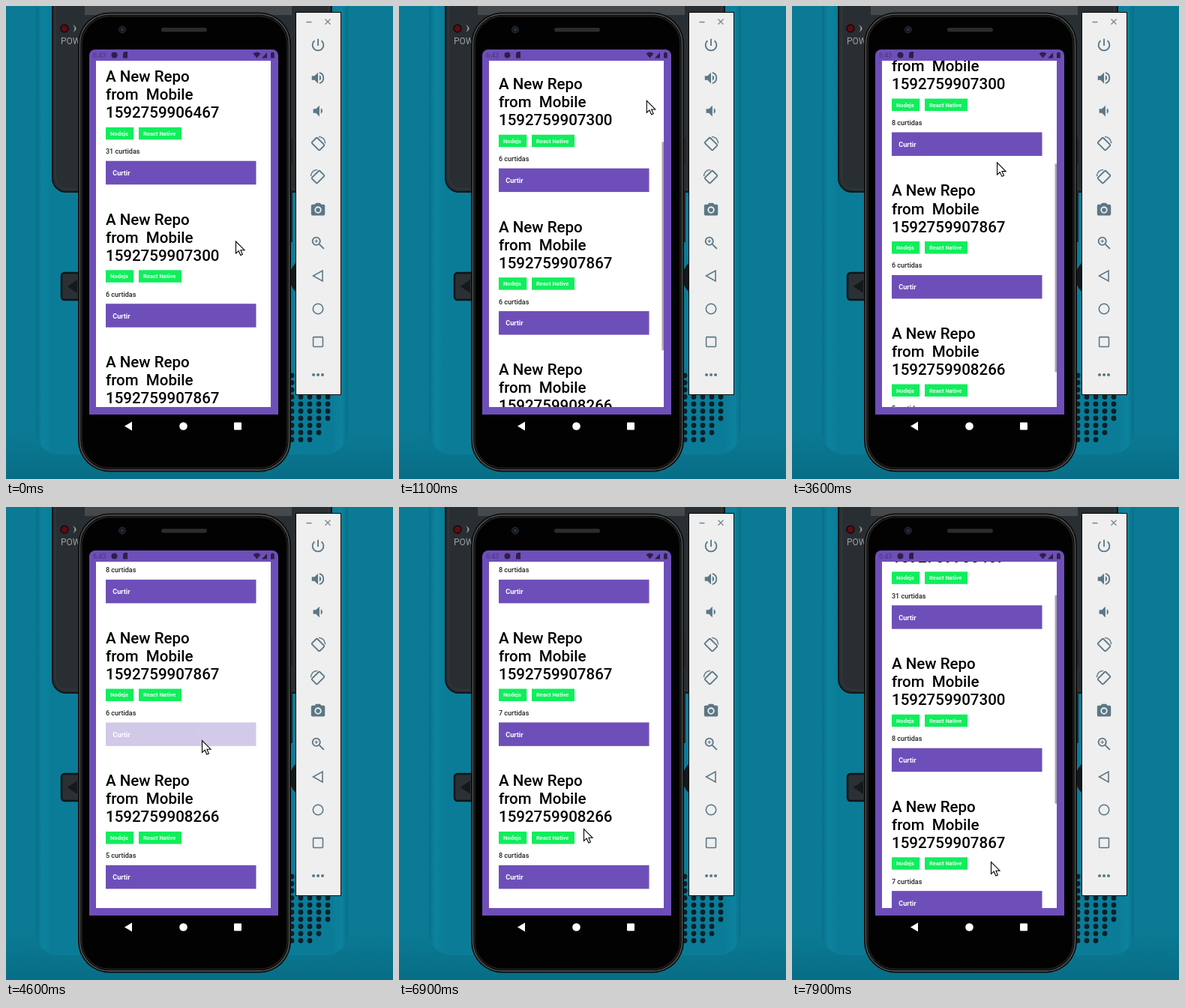
An HTML page for the animation above (8000 ms loop, 516 by 631 pixels).

```html
<!DOCTYPE html>
<html lang="pt">
<head>
<meta charset="utf-8">
<title>Lista de repositórios</title>
<style>
html, body { margin: 0; width: 100%; height: 100%; overflow: hidden; background: #0b7a94; }
svg { position: fixed; left: 0; top: 0; display: block; }
text { font-family: Roboto, "Liberation Sans", sans-serif; font-weight: 700; white-space: pre; }
.title { font-size: 20.5px; font-weight: 500; fill: #000; }
.tag { font-size: 7.6px; fill: #e4ffee; }
.likes { font-size: 9px; font-weight: 500; fill: #222; }
.label { font-size: 9px; fill: #fff; }
.thin { font-weight: 400; }
.solid { fill: #5b7786; stroke: none; }
</style>
</head>
<body>
<svg width="516" height="631" viewBox="0 0 516 631">
  <defs>
    <linearGradient id="wall" x2="0" y2="1">
      <stop offset=".9" stop-color="#0b7a94"/><stop offset="1" stop-color="#086d86"/>
    </linearGradient>
    <linearGradient id="body">
      <stop offset="0" stop-color="#096f88"/><stop offset=".02" stop-color="#0c839e"/>
      <stop offset=".05" stop-color="#0b7c97"/><stop offset=".95" stop-color="#0b7c97"/>
      <stop offset=".98" stop-color="#0c839e"/><stop offset="1" stop-color="#096f88"/>
    </linearGradient>
    <clipPath id="page"><rect x="120" y="73" width="233" height="462"/></clipPath>
  </defs>

  <!-- handheld behind the phone -->
  <rect width="516" height="631" fill="url(#wall)"/>
  <rect x="40" y="-40" width="416" height="638" rx="30" fill="url(#body)"/>
  <rect x="62" y="-30" width="372" height="278" rx="18" fill="#282e31" stroke="#11171a" stroke-width="2"/>
  <rect x="66" y="-30" width="364" height="274" rx="15" fill="none" stroke="#363d40"/>
  <rect x="105" width="276" height="12" fill="#45494b"/>
  <circle cx="78" cy="30" r="5" fill="#5c0d12" stroke="#1a0708" stroke-width="1.5"/>
  <path d="M89 25q5 5 0 10q9-5 0-10" fill="#9aa3a7"/>
  <text class="thin" x="73" y="51" font-size="12" fill="#98a1a5">POWER</text>
  <rect x="74" y="356" width="40" height="36" rx="4" fill="#2a3033" stroke="#0f1518" stroke-width="2.5"/>
  <path d="M82 374L95 365V383Z" fill="#13191c"/>
  <circle cx="405" cy="362" r="27" fill="#12191c"/>
  <g id="holes" fill="#0a2029"></g>

  <!-- phone -->
  <path d="M380 176v36M380 245v70" stroke="#242424" stroke-width="4"/>
  <rect x="96" y="8.500" width="284" height="613" rx="42" fill="#0c0c0c"/>
  <rect x="98.500" y="11" width="279" height="608" rx="39.500" fill="#020202" stroke="#565656" stroke-width="1.500"/>
  <rect x="101" y="13.500" width="274" height="603" rx="37" fill="none" stroke="#1c1c1c" stroke-width="2"/>
  <circle cx="155" cy="31.500" r="4.500" fill="#15191d" stroke="#2a2f33"/>
  <circle cx="155" cy="31.500" r="1.800" fill="#26384a"/>
  <rect x="207" y="29" width="61" height="5.500" rx="2.700" fill="#2b2b2b"/>
  <path d="M111 545V66a8 8 0 0 1 8-8H355a8 8 0 0 1 8 8V545Z" fill="#6e4fb9"/>
  <g fill="#2c2148">
    <text class="thin" x="116" y="69" font-size="9" fill="#48367c">6:43</text>
    <circle cx="144.500" cy="65.500" r="4"/>
    <path d="M156 63l2-2h4v8.500h-6Z"/>
    <path d="M329.500 63.500q5-4 10 0l-5 6Z"/>
    <path d="M341 69.500h7v-7.500Z"/>
    <path d="M353 62.500h1.300v-1h2.200v1h1.300v7h-4.800Z"/>
  </g>
  <rect x="120" y="73" width="233" height="462" fill="#fff"/>
  <g clip-path="url(#page)"><g id="list"></g></g>
  <rect id="bar" x="350.500" width="2.500" height="278" fill="#a8a8a8"/>
  <g fill="#fff">
    <path d="M158 560.500L168 554.500V566.500Z"/>
    <circle cx="236.500" cy="560.500" r="5.300"/>
    <rect x="304" y="555.500" width="10" height="10" rx="1"/>
  </g>

  <!-- emulator toolbar -->
  <rect x="386.500" y="8.500" width="60" height="510" fill="#efefef" stroke="#0a0a0a"/>
  <path d="M400.500 21.500h7M425.500 17.500l7 7m0-7l-7 7" stroke="#78868d" stroke-width="1.300"/>
  <g id="tools" fill="none" stroke="#5b7786" stroke-width="2"></g>

  <path id="cursor" d="M.5 .5V16.500L4.200 13.200L6.800 19L9.400 17.900L6.900 12.200H12Z" fill="#fff" stroke="#000" stroke-width="1.100"/>
</svg>

<script>
const $ = id => document.getElementById(id);
const PITCH = 190.5, TICK = 100, LOOP = 8000;

// Speaker grille: a grid inside a disc
let holes = '';
for (let x = 381; x < 435; x += 12) {
  for (let y = 493; y < 580; y += 9.5) {
    if (Math.hypot(x - 385, y - 535) < 48) holes += `<circle cx="${x}" cy="${y}" r="3.4"/>`;
  }
}
$('holes').innerHTML = holes;

// Toolbar icons on a 24 px grid
const speaker = x => `<path class="solid" d="M${x} 9v6h4l5 5V4l-5 5Z"/>`;
const wave = x => `<path class="solid" d="M${x} 8v8q2.500-1.300 2.500-4t-2.500-4Z"/>`;
const rotate = `<rect x="6.500" y="4" width="11" height="16" rx="1.500" transform="rotate(-45 12 12)"/>
  <path d="M13 1.500q8.500 .5 9.500 9.500" stroke-width="1.600"/>`;
const icons = [
  '<path d="M12 3v10M7 5.800a8 8 0 1 0 10 0"/>',
  speaker(3) + wave(14) + '<path d="M14 4.300a8 8 0 0 1 0 15.400"/>',
  speaker(5) + wave(16),
  rotate,
  `<g transform="matrix(-1 0 0 1 24 0)">${rotate}</g>`,
  `<path class="solid" d="M9 2L7.200 4H4a2 2 0 0 0-2 2v12a2 2 0 0 0 2 2h16a2 2 0 0 0 2-2V6a2 2 0 0 0-2-2h-3.200L15 2Z"/>
   <circle cx="12" cy="12" r="4.100" stroke="#efefef"/>`,
  '<circle cx="9.500" cy="9.500" r="5.500"/><path d="M14 14l6.500 6.500"/><path d="M7 9.500h5M9.500 7v5" stroke-width="1.200"/>',
  '<path d="M5 12L18.500 4.500V19.500Z" stroke-width="1.700"/>',
  '<circle cx="12" cy="12" r="7.300" stroke-width="1.700"/>',
  '<rect x="5" y="5" width="14" height="14" rx="1" stroke-width="1.700"/>',
  [5.5, 12, 18.5].map(x => `<circle class="solid" cx="${x}" cy="12" r="2.200"/>`).join('')
];
$('tools').innerHTML = icons.map((art, i) =>
  `<g transform="translate(405 ${41 + i * 44}) scale(.92)">${art}</g>`).join('');

const tag = (x, w, name) => `<rect x="${x}" y="161.800" width="${w}" height="16.500" fill="#10ee5c"/>
  <text class="tag" x="${x + 6}" y="172.800">${name}</text>`;
const card = ({ id }, i) => `<g transform="translate(0 ${i * PITCH})">
  <text class="title" x="133" y="101.200">A New Repo</text>
  <text class="title" x="133" y="125.300">from  Mobile</text>
  <text class="title" x="133" y="149.300">${id}</text>
  ${tag(133, 37.3, 'Nodejs')}${tag(177, 57, 'React Native')}
  <text class="likes" x="133" y="197.200"></text>
  <g class="press"><rect x="133" y="206.700" width="200.500" height="31.500" fill="#6e4fb9"/>
  <text class="label" x="142.300" y="226">Curtir</text></g></g>`;

// Times are in ticks; taps are the moments the button goes down
const repos = [
  { id: '1592759906467', likes: 31, taps: [] },
  { id: '1592759907300', likes: 6, taps: [22, 28] },
  { id: '1592759907867', likes: 6, taps: [46] },
  { id: '1592759908266', likes: 5, taps: [56, 61, 64] }
];
const drags = [
  { from: 6, to: 11.3, by: 182.3 },
  { from: 33, to: 40, by: 118 },
  { from: 72, to: 79, by: -224.8 }
];
// Places where the pointer turns or rests: tick, x, y
const stops = [
  [6, 306, 313.5], [11.3, 330, 124], [15, 316, 313], [20, 234, 225], [31, 234, 225],
  [33, 266, 258], [40, 284, 132], [45, 261, 311], [50, 261, 311], [55, 210.5, 500],
  [66, 210.5, 500], [69, 246, 429], [72, 263, 247], [79, 265, 473]
];

$('list').innerHTML = repos.map(card).join('');
const likeTexts = document.querySelectorAll('.likes');
const buttons = document.querySelectorAll('.press');

const clamp = v => Math.min(1, Math.max(0, v));
const ease = (from, to, n) => {
  const t = clamp((n - from) / (to - from));
  return t * t * (3 - 2 * t);
};
const scrollAt = n => drags.reduce((sum, d) => sum + d.by * ease(d.from, d.to, n), 0);
const barAt = n => Math.max(...drags.map(d => n > d.from ? clamp((d.to + 5 - n) / 2) : 0));
const pointerAt = (n, k) => stops.reduce((v, stop, i) =>
  i ? v + (stop[k] - stops[i - 1][k]) * ease(stops[i - 1][0], stop[0], n) : stop[k], 0);

function draw(ms) {
  const n = Math.floor(ms % LOOP / TICK);
  const s = scrollAt(n);
  $('list').setAttribute('transform', `translate(0 ${-s})`);
  $('bar').setAttribute('y', 72 + s * .605);
  $('bar').setAttribute('opacity', barAt(n));
  $('cursor').setAttribute('transform', `translate(${pointerAt(n, 1)} ${pointerAt(n, 2)})`);
  repos.forEach(({ likes, taps }, i) => {
    const down = taps.filter(t => t <= n).pop() ?? -LOOP;
    likeTexts[i].textContent = `${likes + taps.filter(t => t < n).length} curtidas`;
    buttons[i].setAttribute('opacity', .3 + .7 * clamp((n - down) / 3));
  });
}

const start = performance.now();
function loop() {
  draw(performance.now() - start);
  requestAnimationFrame(loop);
}
loop();
</script>
</body>
</html>
```
